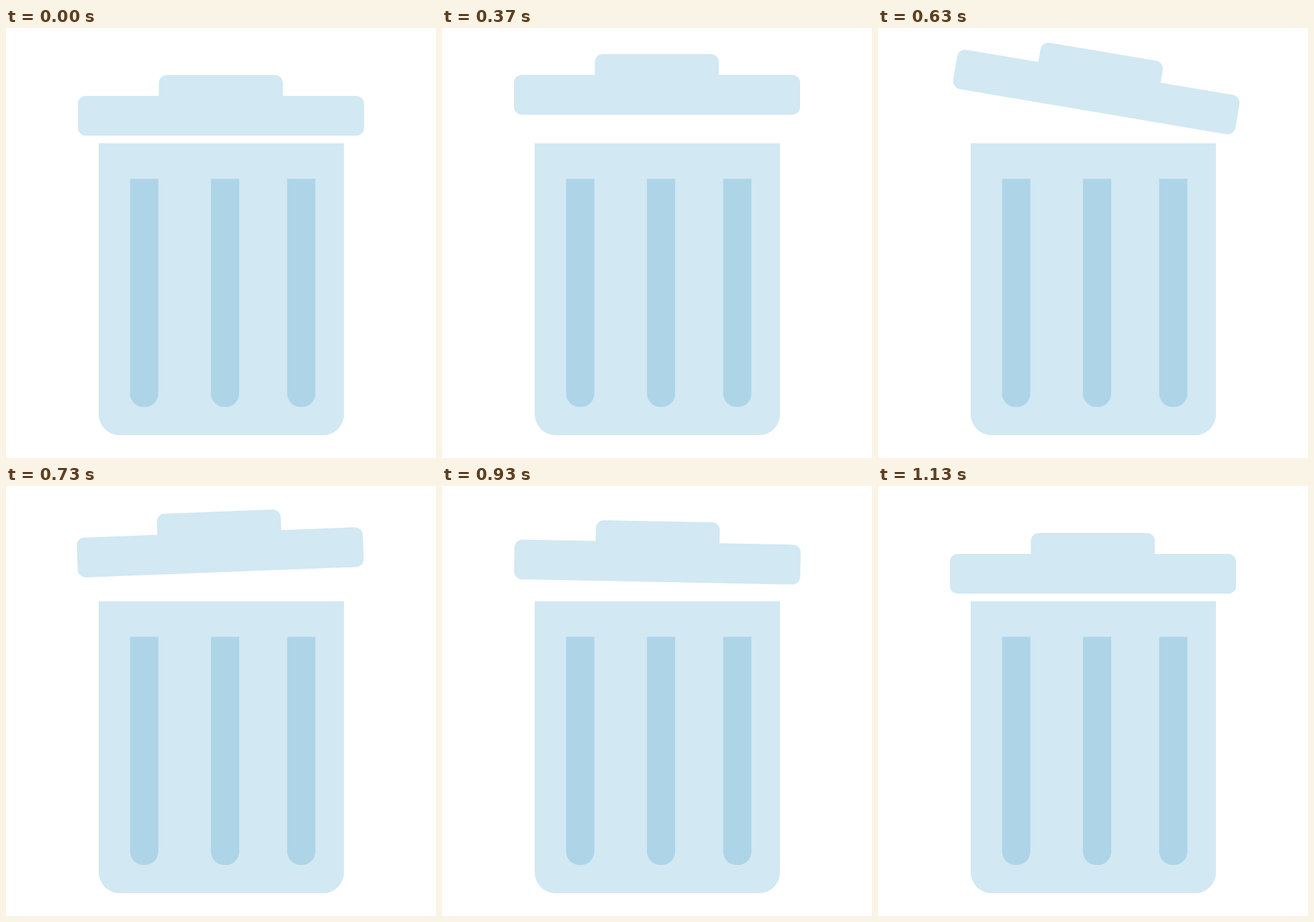
Animation of 640x640 px, one loop 1.61 s. Source, as an HTML page:

```html
<!DOCTYPE html>
<html lang="en">
<head>
<meta charset="utf-8">
<title>Bin</title>
<style>
  html, body { margin: 0; height: 100%; overflow: hidden; background: #fff; }
  svg { display: block; width: 100vw; height: 100vh; }
</style>
</head>
<body>
<svg viewBox="0 0 640 640" fill="#d2e8f2">
  <path d="M138 171.5H503V575a31 31 0 0 1-31 31H169a31 31 0 0 1-31-31Z"/>
  <g fill="#aed4e8">
    <path id="slot" d="M184.7 224.5h42V544a20 20 0 0 1-20 20h-2a20 20 0 0 1-20-20Z"/>
    <use href="#slot" x="120.4"/>
    <use href="#slot" x="233.8"/>
  </g>
  <g id="lid">
    <rect x="107" y="101" width="426" height="59.3" rx="12"/>
    <path d="M227.5 105V82a12 12 0 0 1 12-12H400a12 12 0 0 1 12 12V105Z"/>
  </g>
</svg>
<script>
const LOOP = 1610, LAST = 28;
const lid = document.getElementById('lid');

const ease = u => (1 - Math.cos(Math.PI * u)) / 2;

// Rise, then a slower fall cut short when the lid lands
function lift(step) {
  if (step >= LAST) return 0;
  return 38.1 * (step < 13 ? ease(step / 12.5) : 1 - ease((step - 13) / 19));
}

// Four half swings that get smaller and quicker towards the landing
function tilt(step) {
  const left = Math.min(4, ((LAST - step) / 1.6) ** (1 / 1.7));
  return -3.9 * left * Math.sin(Math.PI * left);
}

// 25 steps a second, shown on a 30 Hz clock rounded to 10 ms
const startOf = step => 10 * Math.round(Math.round(step * 1.2) * 10 / 3);

function draw(now) {
  const t = now % LOOP;
  let step = 0;
  while (step < LAST && startOf(step + 1) <= t) step++;
  lid.setAttribute('transform',
    `translate(0 ${-lift(step)}) rotate(${tilt(step)} 320 160.3)`);
}

const begin = performance.now();
function tick() {
  draw(performance.now() - begin);
  requestAnimationFrame(tick);
}
tick();
</script>
</body>
</html>
```
